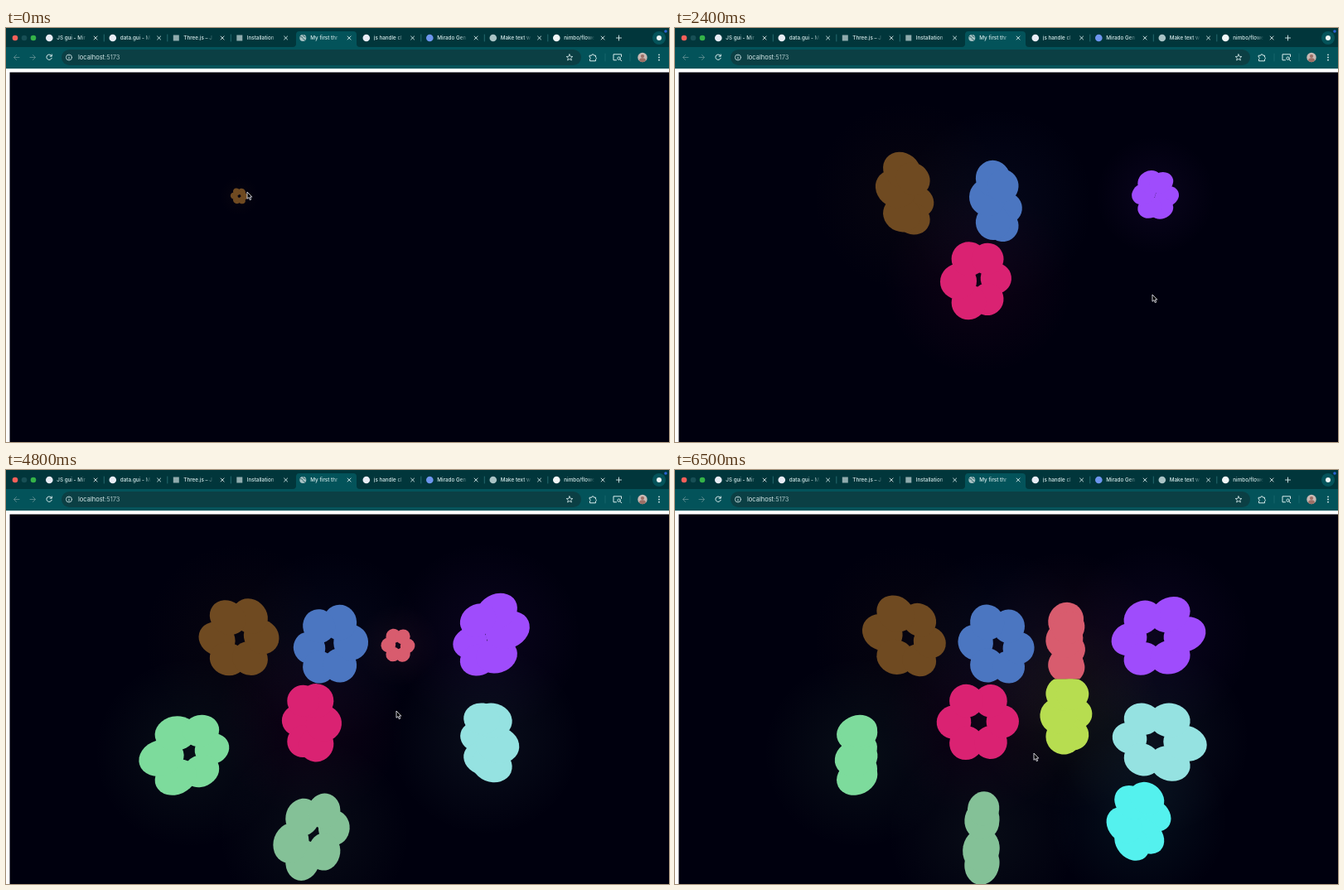
Write an HTML page with a canvas that moves like this. It is 800 by 500 pixels and loops after 6.6 s.

```html
<!DOCTYPE html>
<html lang="en">
<head>
<meta charset="utf-8">
<title>Flowers</title>
<style>
  html, body { margin: 0; width: 100%; height: 100%; overflow: hidden; background: #fff; }
  #stage { position: relative; width: 800px; height: 500px; overflow: hidden; }
  svg, canvas { position: absolute; left: 0; top: 0; }
  span { position: absolute; white-space: nowrap; font-family: Inter, Roboto, sans-serif; color: #d9ecec; }
  .tab {
    top: 7px; width: 37px; height: 10px; overflow: hidden;
    font-size: 6.3px; line-height: 10px; font-weight: 500;
    -webkit-mask-image: linear-gradient(90deg, #000 74%, transparent);
    mask-image: linear-gradient(90deg, #000 74%, transparent);
  }
  .url { left: 87px; top: 30px; font-size: 7.5px; line-height: 11px; }
  .url i { font-style: normal; color: #a9c4c6; }
</style>
</head>
<body>
<div id="stage">
  <svg width="800" height="500" fill="none" stroke="#d9ecec" stroke-linecap="round" stroke-linejoin="round">
    <g stroke="none">
      <rect width="800" height="49" fill="#01363b"/>
      <path d="M346 23q4 0 4-4V8q0-4 4-4h65q4 0 4 4v11q0 4 4 4h373v26H0V23z" fill="#03535a"/>
      <rect x="67" y="26" width="627" height="19" rx="9.5" fill="#0b3f44"/>
      <circle cx="11" cy="12" r="3.3" fill="#f9605a"/>
      <circle cx="22" cy="12" r="3.3" fill="#174f55"/>
      <circle cx="33" cy="12" r="3.3" fill="#34b348"/>
      <circle cx="788" cy="12" r="8" fill="#04545b"/>
      <circle cx="788" cy="12" r="3" fill="#eef6f6"/>
      <circle cx="796" cy="4" r="1.8" fill="#2b65d4"/>
    </g>
    <g id="tabs" stroke-width=".9"></g>
    <path d="M739.5 9v6M736.5 12h6" stroke-width=".9"/>
    <path d="M16 35.500H9.500m3-3-3 3 3 3M29 35.500h6.500m-3-3 3 3-3 3" stroke="#52868a"/>
    <path d="M55 33.700a3.200 3.200 0 1 0 .2 2.600M55.300 32v2.200h-2.200"/>
    <circle cx="76" cy="35.500" r="3.500" stroke-width=".8"/>
    <path d="M76 35.300v2M76 33.500v.1" stroke-width=".9"/>
    <path d="M680 31.800l1.100 2.500 2.700.2-2.100 1.800.7 2.700-2.400-1.500-2.400 1.500.7-2.700-2.100-1.800 2.700-.2z" stroke-width=".8"/>
    <path d="M704.500 33.200h2.200a1.400 1.400 0 0 1 2.800 0h2v2a1.400 1.400 0 0 1 0 2.600v2h-7v-2.200a1.300 1.300 0 0 0 0-2.400z"/>
    <path d="M736.500 38.800h-3.500v-7h9.500v2.700"/>
    <circle cx="739.600" cy="36.600" r="1.700"/>
    <path d="M741 38l1.800 1.800"/>
    <path d="M723 31v9M753 31v9" stroke="#1d6a70" stroke-width=".8"/>
    <g stroke="none">
      <circle cx="768" cy="35.500" r="5.700" fill="#c9b9b4"/>
      <circle cx="768" cy="34" r="2.100" fill="#9c6f66"/>
      <path d="M764 39.500a4 3.200 0 0 1 8 0a5.700 5.700 0 0 1-8 0" fill="#9c6f66"/>
      <g fill="#d9ecec"><circle cx="788" cy="32.300" r=".9"/><circle cx="788" cy="35.500" r=".9"/><circle cx="788" cy="38.700" r=".9"/></g>
    </g>
  </svg>
  <span class="url">localhost<i>:5173</i></span>
  <canvas id="scene" width="800" height="500"></canvas>
</div>
<script>
const LOOP = 6600, STEP = 100;
const VIEW = { x: 4.5, y: 53.5 }, EYE = { x: 405, y: 279.5, d: 294 };
const RING = 29, PETAL = 19.9;
const SPIN = 0.0006;   // radians per ms
const GROW = 0.0012;   // scale per ms
const SEAM = 252.5;    // where the two stacked flowers meet

// x, y, birth time, colour, side of the seam
const flowers = [
  [281.5, 203, -170, '#6f4a21'],
  [390, 212, 380, '#4b76c1'],
  [366.5, 304, 1020, '#da2272'],
  [579.5, 202, 1880, '#9f4cfc'],
  [579, 326.5, 2480, '#95e2e1'],
  [221.5, 341.5, 3035, '#7ddb9c'],
  [371.5, 440, 3790, '#84c197'],
  [473, 212, 4440, '#d85c6e', -1],
  [474, 295.5, 4885, '#b7dd50', 1],
  [560, 422, 5720, '#54f1ee']
].map(([x, y, born, color, side]) => ({ x, y, born, color, side }));

// time, x, y of the pointer tip
const path = [
  [0, 291, 198], [280, 387, 208], [430, 387, 208], [900, 363, 300], [1100, 363, 300],
  [1500, 555, 227], [1780, 577, 198], [1930, 577, 198], [2400, 576, 322], [2560, 576, 322],
  [3000, 218, 336], [3200, 218, 336], [3700, 368, 436], [3840, 368, 436], [4100, 457, 224],
  [4350, 470, 208], [4500, 470, 208], [4780, 471, 291], [4920, 471, 291],
  [5550, 557, 416], [5750, 557, 416], [6500, 433, 342]
];

const tabs = [
  ['JS gui - Mir', '#e8ecf5'], ['data.gui - M', '#e8ecf5'],
  ['Three.js – J', '#8fabad', 'square'], ['Installation', '#8fabad', 'square'],
  ['My first thr', '', 'globe'], ['js handle cl', '#e8ecf5'],
  ['Mirado Gen', '#6d95ee'], ['Make text w', '#a9c3c5'], ['nimbo/flowe', '#f2f7f7']
];

function tabIcon(x, color, shape) {
  if (shape === 'globe')
    return `<circle cx="${x}" cy="12" r="4" fill="#a9c3c5" stroke="none"/>
      <path d="M${x - 3} 10.500q2.500 0 3 2t2.500 2M${x} 8.500q0 2 3 2.500" stroke="#2c6268"/>`;
  if (shape === 'square')
    return `<rect x="${x - 3.5}" y="8.500" width="7" height="7" fill="${color}" stroke="none"/>`;
  return `<circle cx="${x}" cy="12" r="4.300" fill="${color}" stroke="none"/>`;
}

function buildTabs() {
  const stage = document.getElementById('stage');
  let marks = '';
  tabs.forEach(([title, color, shape], i) => {
    const x = 52.3 + i * 76.5;
    marks += tabIcon(x, color, shape);
    marks += `<path d="M${x + 53.8} 10l4 4m0-4-4 4"/>`;
    if (i !== 3 && i !== 4 && i !== 8)
      marks += `<path d="M${x + 66} 8v8" stroke="#2a7076"/>`;
    const label = document.createElement('span');
    label.className = 'tab';
    label.style.left = x + 9 + 'px';
    label.textContent = title;
    stage.append(label);
  });
  document.getElementById('tabs').innerHTML = marks;
}

const ctx = document.getElementById('scene').getContext('2d');

// Adds the perspective outline of a sphere at camera-space x, y, depth z
function addSphere(x, y, z, r) {
  const off = Math.hypot(x, y), dir = Math.atan2(y, x);
  const tilt = Math.atan2(off, z), half = Math.asin(r / Math.hypot(off, z));
  const near = EYE.d * Math.tan(tilt - half), far = EYE.d * Math.tan(tilt + half);
  const mid = (near + far) / 2;
  const minor = EYE.d * Math.sin(half) / Math.sqrt(Math.cos(tilt) ** 2 - Math.sin(half) ** 2);
  ctx.beginPath();
  ctx.ellipse(EYE.x + mid * Math.cos(dir), EYE.y + mid * Math.sin(dir),
    (far - near) / 2, minor, dir, 0, 2 * Math.PI);
}

function drawGlow({ x, y, color }, scale) {
  const r = 115 * scale;
  const glow = ctx.createRadialGradient(x, y, 0, x, y, r);
  glow.addColorStop(0, color + '10');
  glow.addColorStop(0.45, color + '09');
  glow.addColorStop(1, color + '00');
  ctx.fillStyle = glow;
  ctx.fillRect(x - r, y - r, 2 * r, 2 * r);
}

function drawFlower({ x, y, color, side, born }, scale, t) {
  const turn = (t - born) * SPIN;
  ctx.save();
  if (side) {
    ctx.beginPath();
    ctx.rect(0, side < 0 ? 0 : SEAM, 800, side < 0 ? SEAM : 500);
    ctx.clip();
  }
  ctx.fillStyle = color;
  for (let i = 0; i < 6; i++) {
    const a = i * Math.PI / 3;
    const px = RING * scale * Math.cos(a), py = RING * scale * Math.sin(a);
    addSphere(x - EYE.x + px * Math.cos(turn), y - EYE.y + py,
      EYE.d + px * Math.sin(turn), PETAL * scale);
    ctx.fill();
  }
  ctx.restore();
}

function pointerAt(t) {
  const i = path.findIndex(p => p[0] > t);
  if (i < 0) return path[path.length - 1].slice(1);
  const [t0, x0, y0] = path[i - 1], [t1, x1, y1] = path[i];
  const u = (t - t0) / (t1 - t0), e = u * u * (3 - 2 * u);
  return [x0 + (x1 - x0) * e, y0 + (y1 - y0) * e];
}

const arrow = new Path2D('M0 0V8.300L1.900 6.600L3.300 9.700L4.700 9.100L3.300 6.100H5.800Z');

function drawPointer(t) {
  ctx.save();
  ctx.translate(...pointerAt(t));
  ctx.fillStyle = '#000';
  ctx.strokeStyle = '#e4e4ea';
  ctx.lineWidth = 0.9;
  ctx.fill(arrow);
  ctx.stroke(arrow);
  ctx.restore();
}

function draw(t) {
  ctx.clearRect(0, 0, 800, 500);
  ctx.save();
  ctx.beginPath();
  ctx.rect(VIEW.x, VIEW.y, 800, 500);
  ctx.clip();
  ctx.fillStyle = '#00000e';
  ctx.fillRect(0, 0, 800, 500);
  const alive = flowers
    .map(f => [f, Math.min(1, (t - f.born) * GROW)])
    .filter(([, scale]) => scale > 0);
  alive.forEach(([f, scale]) => drawGlow(f, scale));
  alive.forEach(([f, scale]) => drawFlower(f, scale, t));
  drawPointer(t);
  ctx.restore();
}

const start = performance.now();
function tick() {
  const ms = (performance.now() - start) % LOOP;
  draw(Math.floor(ms / STEP) * STEP);
  requestAnimationFrame(tick);
}
buildTabs();
tick();
</script>
</body>
</html>
```
